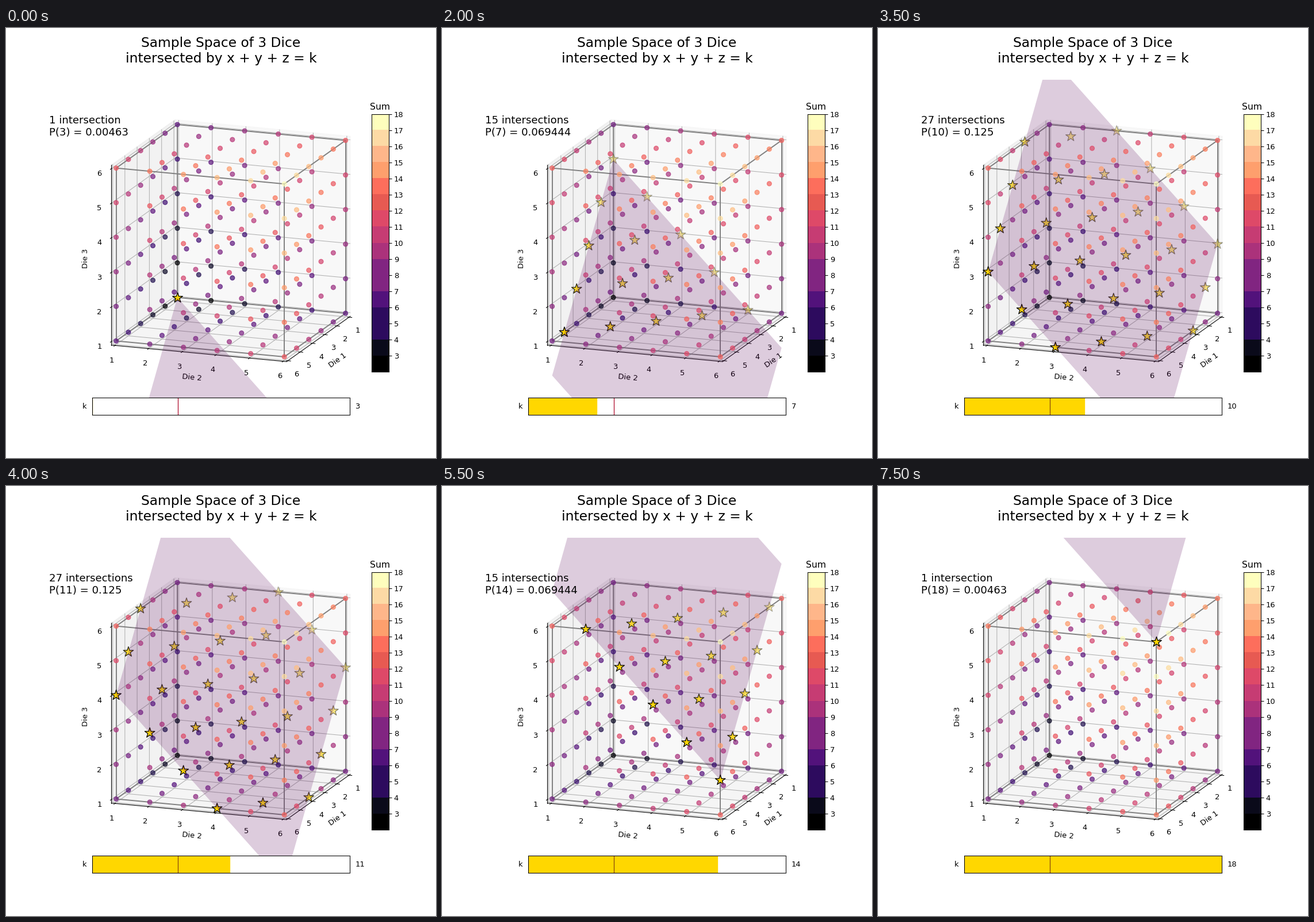
Animation, 748 px wide and 748 px high, one loop 8 s. Source, as a matplotlib script:

```python
from itertools import combinations, product

import matplotlib.pyplot as plt
import numpy as np
from matplotlib.animation import FuncAnimation
from matplotlib.collections import LineCollection
from matplotlib.colors import ListedColormap
from matplotlib.patches import Polygon

ELEV, AZIM = np.radians([15, 20])
LOW, HIGH = 1 - 5 / 48, 6 + 5 / 48      # bounds of the panes
DELTA = 5 / 12
PER_POINT = 48 / (2 * 0.77 * 8 * 72)    # label offset for one point
TICK_PAD = 11.5 * PER_POINT * DELTA
LABEL_PAD = 25 * PER_POINT * DELTA

RIGHT = np.array([-np.sin(AZIM), np.cos(AZIM), 0])
UP = np.array([-np.cos(AZIM) * np.sin(ELEV), -np.sin(AZIM) * np.sin(ELEV), np.cos(ELEV)])
TOWARD = np.array([np.cos(AZIM) * np.cos(ELEV), np.sin(AZIM) * np.cos(ELEV), np.sin(ELEV)])

BAR_COLORS = ["#000000", "#0a0a1a", "#2d0b5e", "#2d0b5e", "#52127b", "#812581",
              "#812581", "#ab327b", "#c63c73", "#de4968", "#e75a52", "#fd6e5c",
              "#fe9f6d", "#feb68a", "#fddaa5", "#fefebd"]

ROLLS = np.array(list(product(range(1, 7), repeat=3)))
SUMS = ROLLS.sum(axis=1)


def project(points):
    """Orthographic projection of dice coordinates."""
    centred = (np.asarray(points, float) - 3.5) * 0.2
    return centred @ np.column_stack([RIGHT, UP])


def with_values(base, **values):
    point = list(base)
    for name, value in values.items():
        point["xyz".index(name)] = value
    return point


def draw_panes():
    for axis, gray in zip("xyz", (0.95, 0.90, 0.925)):
        a, b = [n for n in "xyz" if n != axis]
        corners = [with_values([LOW] * 3, **{a: u, b: v})
                   for u, v in ((LOW, LOW), (LOW, HIGH), (HIGH, HIGH), (HIGH, LOW))]
        color = (gray, gray, gray, 0.5)
        ax.add_patch(Polygon(project(corners), facecolor=color, edgecolor=color,
                             lw=1, zorder=0))


def draw_axis(axis, edge, tick_dir, name, angle):
    """Grid, axis line, ticks and labels; edge gives the two fixed coordinates."""
    grid = []
    others = [n for n in "xyz" if n != axis]
    base = with_values([LOW] * 3, **edge)
    for value in range(1, 7):
        corner = with_values([LOW] * 3, **{axis: value})
        ends = [with_values(corner, **{n: HIGH}) for n in others]
        grid.append(project([ends[0], corner, ends[1]]))

        at = edge[tick_dir]
        tick = project([with_values(base, **{axis: value, tick_dir: at + f * DELTA})
                        for f in (-0.1, 0.2)])
        ax.plot(*tick.T, color="k", lw=0.8, zorder=1.5)
        ax.text(*project(pushed(base, axis, value, others, TICK_PAD)), str(value),
                ha="center", va="top")
    ax.add_collection(LineCollection(grid, colors="#b0b0b0", linewidths=0.8, zorder=1))
    line = project([with_values(base, **{axis: v}) for v in (LOW, HIGH)])
    ax.plot(*line.T, color="k", lw=0.8, zorder=1.5)
    ax.text(*project(pushed(base, axis, 3.5, others, LABEL_PAD)), name,
            ha="center", va="center", rotation=angle)


def pushed(base, axis, value, others, pad):
    point = with_values(base, **{axis: value})
    for n in others:
        i = "xyz".index(n)
        point[i] += np.copysign(pad, point[i] - 3.5)
    return point


def slope(vector):
    return np.degrees(np.arctan2(vector[1], vector[0]))


fig = plt.figure(figsize=(8, 8), dpi=93.5)
fig.suptitle("Sample Space of 3 Dice\nintersected by x + y + z = k", fontsize=18)
note = fig.text(0.1, 0.75, "", fontsize=14)

ax = fig.add_axes([0.1275, 0.11, 0.77, 0.77])
ax.set_axis_off()
draw_panes()
origin, x_end, y_end = project([(0, 0, 0), (1, 0, 0), (0, 1, 0)])
draw_axis("x", {"y": HIGH, "z": LOW}, "y", "Die 1", slope(origin - x_end))
draw_axis("y", {"x": HIGH, "z": LOW}, "x", "Die 2", slope(y_end - origin))
draw_axis("z", {"x": HIGH, "y": LOW}, "x", "Die 3", 90)
for start, end in combinations(product((1, 6), repeat=3), 2):
    if sum(a != b for a, b in zip(start, end)) == 1:
        ax.plot(*project([start, end]).T, color="gray", lw=1.5, zorder=2)
ax.set(xlim=(-0.95, 0.9), ylim=(-0.95, 0.9))
ax.autoscale(False)

bar = fig.add_axes([0.85, 0.2, 0.04, 0.6])
bar.imshow(np.arange(16)[:, None], cmap=ListedColormap(BAR_COLORS), origin="lower",
           extent=(0, 1, 2, 18), aspect="auto", interpolation="nearest")
bar.yaxis.tick_right()
bar.set(xticks=[], yticks=range(3, 19), ylim=(2, 18))
bar.set_title("Sum", fontsize=12)

slider = fig.add_axes([0.2, 0.1, 0.6, 0.04])
slider.set(xticks=[], yticks=[], xlim=(3, 18), ylim=(0, 1))
slider.autoscale(False)
slider.text(-0.02, 0.5, "k", transform=slider.transAxes, ha="right", va="center")
value_text = slider.text(1.02, 0.5, "", transform=slider.transAxes, va="center")
start_line = slider.axvline(8, lw=1, zorder=2)

moving = []


def draw_stars(rolls, zorder):
    depth = rolls @ TOWARD
    span = np.ptp(depth)
    alpha = 1 - 0.7 * (depth.max() - depth) / span if span > 0 else np.ones(1)
    faces = np.tile([1, 215 / 255, 0, 1], (len(rolls), 1))
    edges = np.tile([0.0, 0, 0, 1], (len(rolls), 1))
    faces[:, 3] = edges[:, 3] = alpha
    return ax.scatter(*project(rolls).T, s=200, marker="*", facecolors=faces,
                      edgecolors=edges, zorder=zorder)


def update(i):
    while moving:
        moving.pop().remove()
    k = i + 3
    hit = SUMS == k

    # Layers follow the nearest point of each part.
    dots_z = 4 if k == 18 else 7
    stars_z = 6 if k >= 13 else 4.5
    moving.append(ax.scatter(*project(ROLLS[~hit]).T, c=SUMS[~hit], cmap="magma",
                             s=36, alpha=0.7, zorder=dots_z))
    corners = [(x, y, k - x - y) for x, y in ((1, 1), (6, 1), (6, 6), (1, 6))]
    moving.append(ax.add_patch(Polygon(project(corners), facecolor=(0.34, 0, 0.34, 0.2),
                                       edgecolor="none", lw=0, zorder=5)))
    moving.append(draw_stars(ROLLS[hit], stars_z))
    moving.append(slider.axvspan(3, k, facecolor="gold", edgecolor="gold", zorder=1))

    count = int(hit.sum())
    plural = "" if count == 1 else "s"
    note.set_text(f"{count} intersection{plural}\nP({k}) = {round(count / 216, 6)}")
    value_text.set_text(str(k))
    start_line.set_color("#b01030" if k < 8 else "#8b4a0c")
    return moving


anim = FuncAnimation(fig, update, frames=16, interval=500, repeat=True, repeat_delay=0)
plt.show()
```
